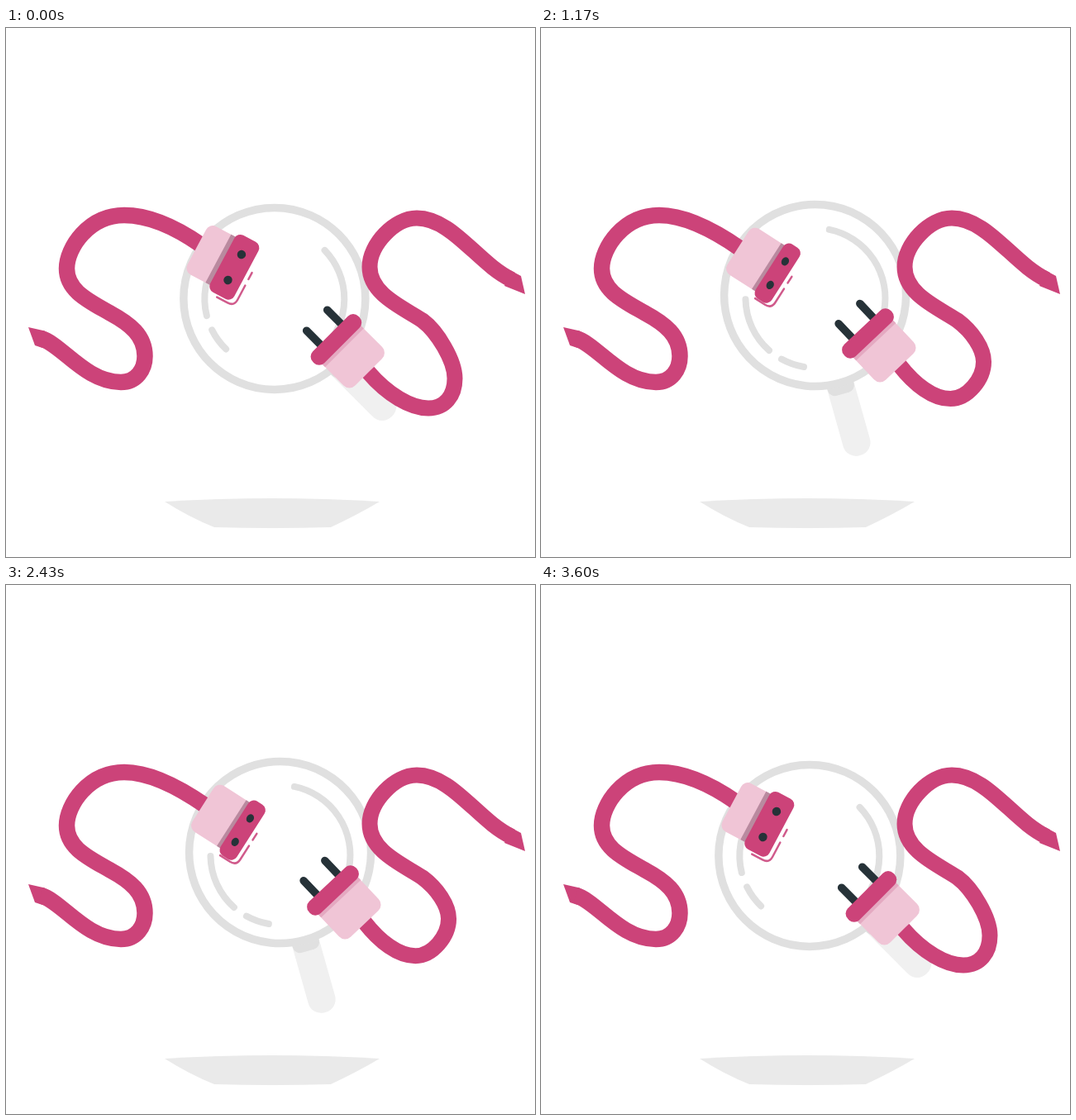
Write an HTML page with a canvas that moves like this. It is 640x640 px and loops after 3630 ms.

```html
<!DOCTYPE html>
<html>
<head>
<meta charset="utf-8">
<style>
  html, body { margin: 0; width: 100%; height: 100%; overflow: hidden; background: #fff; }
  canvas { display: block; }
</style>
</head>
<body>
<canvas id="stage" width="640" height="640"></canvas>
<script>
const ctx = document.getElementById('stage').getContext('2d');
const LOOP = 3630, HALF = 1800, DEG = Math.PI / 180;
const PINK = '#cc4379', PALE = '#f0c5d6', DARK = '#263238', RING = '#e0e0e0';

const mix = (a, b, k) => a + (b - a) * k;

function stroke(path, color, width, cap = 'butt') {
  ctx.strokeStyle = color;
  ctx.lineWidth = width;
  ctx.lineCap = cap;
  ctx.stroke(new Path2D(path));
}

function fill(path, color) {
  ctx.fillStyle = color;
  ctx.fill(new Path2D(path));
}

function box(x1, y1, x2, y2, color, radii = 0) {
  ctx.fillStyle = color;
  ctx.beginPath();
  ctx.roundRect(x1, y1, x2 - x1, y2 - y1, radii);
  ctx.fill();
}

// Arc with angles in degrees, clockwise from the top
function arc(r, from, to, width) {
  ctx.strokeStyle = RING;
  ctx.lineWidth = width;
  ctx.lineCap = 'round';
  ctx.beginPath();
  ctx.arc(0, 0, r, (from - 90) * DEG, (to - 90) * DEG);
  ctx.stroke();
}

function placed(x, y, degrees, draw) {
  ctx.save();
  ctx.translate(x, y);
  ctx.rotate(degrees * DEG);
  draw();
  ctx.restore();
}

function magnifier(p) {
  placed(335.8, 338.4, -45 * p, () => {
    box(-16.8, 97, 16.8, 185.6, '#f0f0f0', [0, 0, 16, 16]);
    box(-16.5, 92, 16.5, 108.5, RING, [0, 0, 9, 9]);
    ctx.translate(0, -15.5);
    arc(110, 0, 360, 9.5);
  });
  placed(335.8 - 11 * p, 326.6 + p * p, 53 * p, () => {
    arc(84.5, -7, 82.5, 8);
    arc(84.5, 203, 250.5, 8);
    arc(84.5, 171, 190.5, 8);
  });
}

function cables(p) {
  fill('M27 362 L47 366.5 L44 387 L35 384Z', PINK);
  stroke(`M42 375.5 C67 382 96 428.5 139 428.5 C158 428.5 168 413 168 397
    C168 372 150 358 126 345 C100 330 73.5 318 73.5 291 C73.5 266 100 226.5 143 226.5
    C175 226.5 ${mix(212, 208, p)} ${mix(247, 243, p)} ${mix(245, 236, p)} ${mix(270, 262.5, p)}`, PINK, 19.5);

  const sideX = mix(531.5, 543, p), sideY = mix(393, 424, p);
  const lowX = mix(487, 511, p), lowY = mix(442.5, 460, p);
  fill('M623 300 L628 322 L603 312 L610 293Z', PINK);
  stroke(`M612 304.5 C572 286 540 230 497 230 C470 230 440 262 440 289
    C440 322 480 338 504 354 C521.5 367 ${sideX} ${sideY - 13 - 9 * p} ${sideX} ${sideY}
    C${sideX} ${sideY + 21} ${mix(508, 531, p)} ${lowY} ${lowX} ${lowY}
    C${lowX - 21} ${lowY} ${mix(447, 462, p)} ${mix(425, 444, p)} ${mix(431, 438, p)} ${mix(403, 416, p)}`, PINK, 19);
}

function socket(p) {
  placed(mix(291.5, 276.7, p), mix(300.5, 289.5, p), 35 - 7 * p, () => {
    const back = mix(-9, -17, p), front = mix(9, 16, p), gap = mix(14, 21.5, p);
    const start = mix(-9, -2, p), low = mix(39.5, 42, p), shift = mix(-2.5, 0, p);
    box(mix(-59.5, -52, p), -33, back + 4, 33, PALE, [9, 0, 0, 9]);
    box(mix(-12.5, -22.5, p), -33, back + 4, 33, '#b98a9f');
    box(back, -39, front, 39, PINK, 8);
    ctx.fillStyle = DARK;
    for (const y of [-1, 1]) {
      ctx.beginPath();
      ctx.ellipse(0, y * mix(16.6, 17.5, p), mix(3.9, 5.2, p), 5.3, 0, 0, 7);
      ctx.fill();
    }
    stroke(`M${start} ${low} H${gap - 9} Q${gap} ${low} ${gap} ${low - 9} V${13.5 + shift}
      M${gap} ${5 + shift} V${shift - 4}`, '#d05a8b', 2.5, 'round');
  });
}

function plug(p) {
  placed(mix(393.5, 399.5, p), mix(365.5, 377, p), 47.5 - 2.5 * p, () => {
    stroke('M-33 -17.7 H-6 M-33 17.7 H-6', DARK, 9.5, 'round');
    box(5, -33, 55.5, 33, PALE, [0, 10, 10, 0]);
    box(5, -33, 14, 33, '#e4a9c1');
    box(-10, -39, 9.8, 39, PINK, 9);
  });
}

function bolt(x, y, t, peakTime, peak) {
  ctx.globalAlpha = Math.max(0, peak * (1 - Math.abs(t - peakTime) / 140));
  stroke(`M${x} ${y} l4 -39 l14.5 20 l4 -45`, '#263033', 4.5);
  ctx.globalAlpha = 1;
}

// A dash that grows to its full length, then vanishes
function spark(x, y, angle, t, begin, duration, length) {
  const k = (t - begin) / duration;
  if (k <= 0 || k > 1) return;
  placed(x, y, angle, () => stroke(`M0 0 H${length * k}`, '#000', 5));
}

function draw(t) {
  const p = Math.min(1, Math.abs(1 - t / HALF));
  ctx.clearRect(0, 0, 640, 640);
  fill('M192 573 Q322 565 452 573 Q425 589 393 604 Q322 606 252 604 Q222 592 192 573Z', '#eaeaea');
  magnifier(p);
  cables(p);
  socket(p);
  plug(p);
  bolt(384, 318, t, 270, 0.35);
  bolt(368, 302, t, 1430, 0.7);
  spark(347, 318.5, 46.5, t, 200, 150, 30);
  spark(290.5, 356, 60, t, 1405, 130, 24);
  spark(345, 365, -45, t, 2803, 130, 26);
}

function tick(now) {
  draw(now % LOOP);
  requestAnimationFrame(tick);
}
requestAnimationFrame(tick);
</script>
</body>
</html>
```
